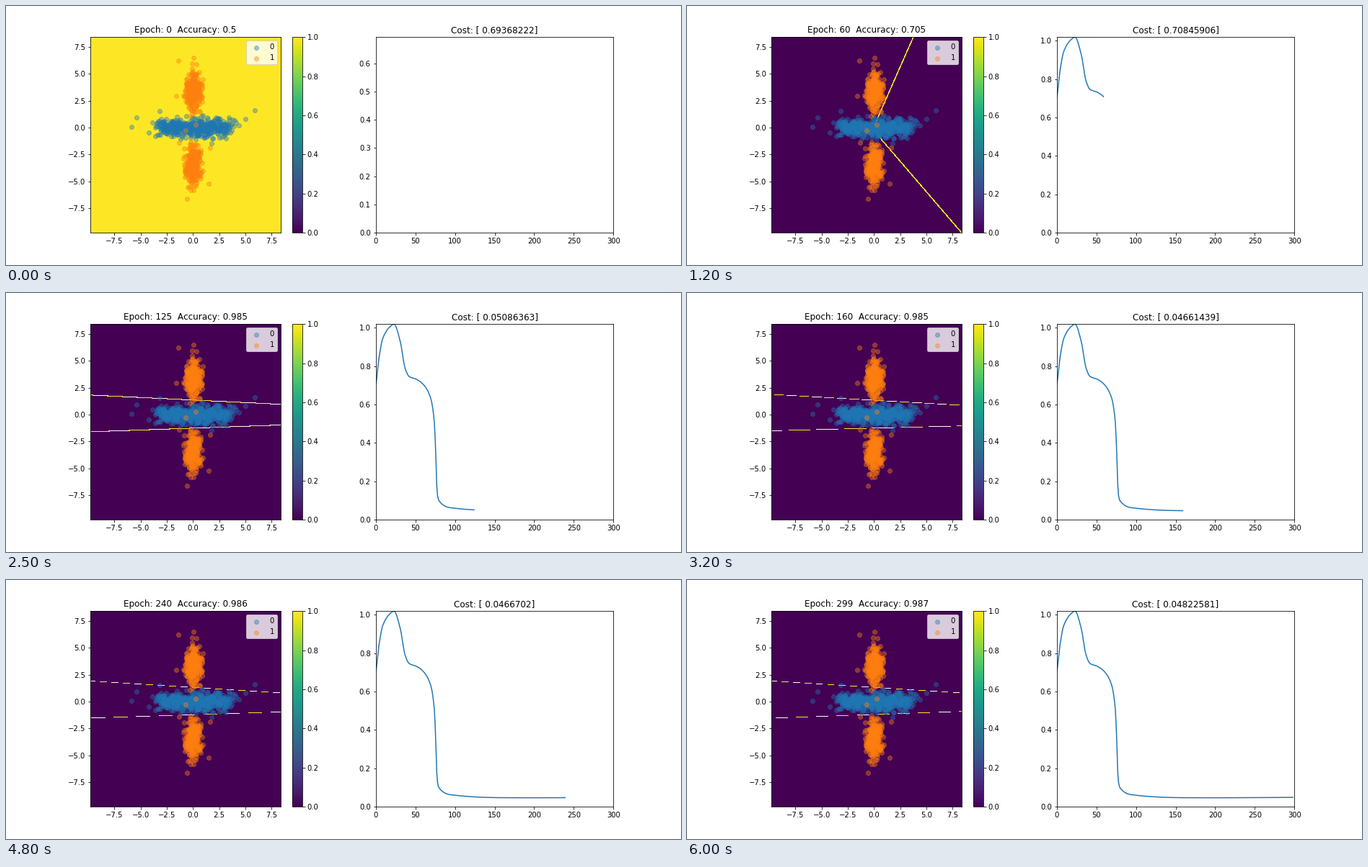
A matplotlib script that plays this animation: 936 by 360 pixels, repeating every 6100 ms.

```python
import matplotlib.pyplot as plt
import numpy as np
from matplotlib.animation import FuncAnimation
from matplotlib.cm import ScalarMappable
from matplotlib.colors import Normalize

plt.rcParams.update({"font.family": "DejaVu Sans", "font.size": 10,
                     "text.kerning_factor": 6})

W, H = 936, 360
X_LIM, Y_LIM = (-9.79, 8.37), (-9.78, 8.42)
COLS, ROWS = 264, 272
YELLOW, PURPLE, WHITE = (253, 231, 37), (68, 1, 84), (255, 255, 255)
EPOCHS = list(range(0, 300, 5)) + [299]

# epoch, cost
COST = np.array([
    (0, 0.69368222), (1, 0.703), (5, 0.838), (10, 0.945), (20, 1.0085633),
    (24, 1.0185), (32, 0.927), (38, 0.79), (43, 0.746), (52, 0.7315),
    (60, 0.70845906), (70, 0.637), (75, 0.505), (77, 0.31), (78.5, 0.14),
    (81, 0.097), (95, 0.06224252), (160, 0.04661439), (200, 0.0461),
    (240, 0.0466702), (299, 0.04822581)])


def monotone(points, x):
    """Monotone cubic curve through a few points."""
    xs, ys = points.T
    h = np.diff(xs)
    d = np.diff(ys) / h
    m = np.zeros_like(ys)
    same = d[:-1] * d[1:] > 0
    w1, w2 = 2 * h[1:] + h[:-1], h[1:] + 2 * h[:-1]
    m[1:-1][same] = ((w1 + w2)[same]
                     / (w1[same] / d[:-1][same] + w2[same] / d[1:][same]))
    m[0], m[-1] = d[0], d[-1]
    i = np.clip(np.searchsorted(xs, x, "right") - 1, 0, len(h) - 1)
    s = (x - xs[i]) / h[i]
    return (ys[i] * (1 + 2 * s) * (1 - s) ** 2
            + ys[i + 1] * s ** 2 * (3 - 2 * s)
            + h[i] * s * (1 - s) * (m[i] * (1 - s) - m[i + 1] * s))


def accuracy(epoch):
    value = np.interp(epoch, [38, 60, 78, 170, 240, 299],
                      [0.5, 0.705, 0.985, 0.985, 0.986, 0.987])
    return round(float(value), 3)


def cloud(rng, centers, sd, strays):
    """Equal Gaussian clusters with trimmed tails, plus a few strays."""
    parts = [strays]
    for c in centers:
        z = rng.normal(size=(400, 2))
        parts.append(c + z[np.hypot(*z.T) < 2.7][:248] * sd)
    return np.vstack(parts)


rng = np.random.default_rng(4)
blue = cloud(rng, [(-1.6, 0), (1.6, 0)], (1.2, 0.44),
             [(5.9, 1.6), (5.0, 0.8), (-5.9, 0.05), (-5.35, 0.92),
              (-3.2, 1.55), (1.8, -1.45)])
orange = cloud(rng, [(0.03, 3.45), (0.03, -3.5)], (0.43, 0.93),
               [(0.05, 6.5), (-1.4, 6.2), (-1.6, 2.95), (-0.55, -6.6),
                (-1.35, -1.4), (1.65, -1.85), (1.5, -5.2),
                (-0.7, -0.25), (0.25, 0.25)])
cost = monotone(COST, np.arange(300))

fig = plt.figure(figsize=(W / 72, H / 72), dpi=72, facecolor="white")
left, bottom, height = 0.125, 0.125, 0.755
full = 0.775 / 2.2
ax = fig.add_axes([left, bottom, full * 0.8, height])
cax = fig.add_axes([left + full * 0.85, bottom, height * H / 20 / W, height])
cost_ax = fig.add_axes([0.9 - full, bottom, full, height])

ax.set(xlim=X_LIM, ylim=Y_LIM)
(ex0, ey0), (ex1, ey1) = ax.transData.inverted().transform(
    [(117, 45), (117 + COLS, 45 + ROWS)])
field = ax.imshow(np.zeros((ROWS, COLS, 3), np.uint8), aspect="auto",
                  extent=(ex0, ex1, ey0, ey1), interpolation="nearest")
ticks = np.arange(-7.5, 8, 2.5)
ax.set(xlim=X_LIM, ylim=Y_LIM, xticks=ticks, yticks=ticks)
for pts, color, label in ((blue, "C0", "0"), (orange, "C1", "1")):
    ax.scatter(*pts.T, color=color, alpha=0.4, label=label)
ax.legend(loc="upper right")
fig.colorbar(ScalarMappable(Normalize(0, 1), plt.get_cmap("viridis", 100)),
             cax=cax)
curve, = cost_ax.plot([], [], color="C0", lw=1.5)
cost_ax.set_xlim(0, 300)

px, py = np.meshgrid(np.arange(COLS) + 0.5, np.arange(ROWS) + 0.5)


def near(p, q, width):
    """Pixels whose centre lies on a stroke from p to q (data units)."""
    (x0, y0), (x1, y1) = [((x - ex0) / (ex1 - ex0) * COLS,
                           (ey1 - y) / (ey1 - ey0) * ROWS) for x, y in (p, q)]
    dx, dy = x1 - x0, y1 - y0
    t = np.clip(((px - x0) * dx + (py - y0) * dy) / (dx * dx + dy * dy), 0, 1)
    return np.hypot(px - x0 - t * dx, py - y0 - t * dy) < width / 2


def settling(epoch):
    """1 until epoch 95, then decays to 0."""
    return np.exp(-max(0, epoch - 95) / 38)


def boundaries(epoch):
    """Upper and lower decision line: first a wedge, later a flat band."""
    if epoch < 40:
        return []
    if epoch < 75:
        u = ((epoch - 40) / 30) ** 2
        apex, reach = 2.2 - 4.95 * u, 14
        return [((apex, y), (apex + reach, y + reach * slope))
                for y, slope in ((0.1, 3.5 - 2.9 * u),
                                 (-0.3, -1.64 + 1.14 * u))]
    q = settling(epoch)
    flare = 0.9 * np.exp((75 - epoch) / 3)
    keys = [95, 160, 240, 299]
    low_left = np.interp(epoch, keys, [-1.69, -1.51, -1.534, -1.544])
    low_right = np.interp(epoch, keys, [-0.9, -1.056, -0.965, -0.918])
    return [((ex0, 1.92 - 0.23 * q - flare), (ex1, 0.8 + 0.34 * q + flare)),
            ((ex0, low_left + flare), (ex1, low_right - flare))]


def paint(epoch):
    img = np.empty((ROWS, COLS, 3), np.uint8)
    img[:] = YELLOW if epoch == 0 else PURPLE
    width = 0.6 + settling(epoch)
    for k, (p, q) in enumerate(boundaries(epoch)):
        stroke = near(p, q, width)
        # Every other row turns pale where the line is one pixel thick.
        thin = ~(np.roll(stroke, 1, 0) | np.roll(stroke, -1, 0))
        pale = np.arange(ROWS)[:, None] % 2 != k
        img[stroke] = YELLOW
        img[stroke & thin & pale] = WHITE
    return img


def number(c):
    return f"{c:.7f}" if c >= 1 else f"{c:.8f}".rstrip("0")


def update(i):
    epoch = EPOCHS[i]
    field.set_data(paint(epoch))
    ax.set_title(f"Epoch: {epoch}  Accuracy: {accuracy(epoch)}", fontsize=12)
    cost_ax.set_title(f"Cost: [ {number(cost[epoch])}]", fontsize=12)
    curve.set_data(np.arange(epoch), cost[1:epoch + 1])
    cost_ax.set_ylim(0, cost[:epoch + 1].max())
    return field, curve


anim = FuncAnimation(fig, update, frames=len(EPOCHS), interval=100,
                     repeat=True, repeat_delay=0, blit=False)
plt.show()
```
